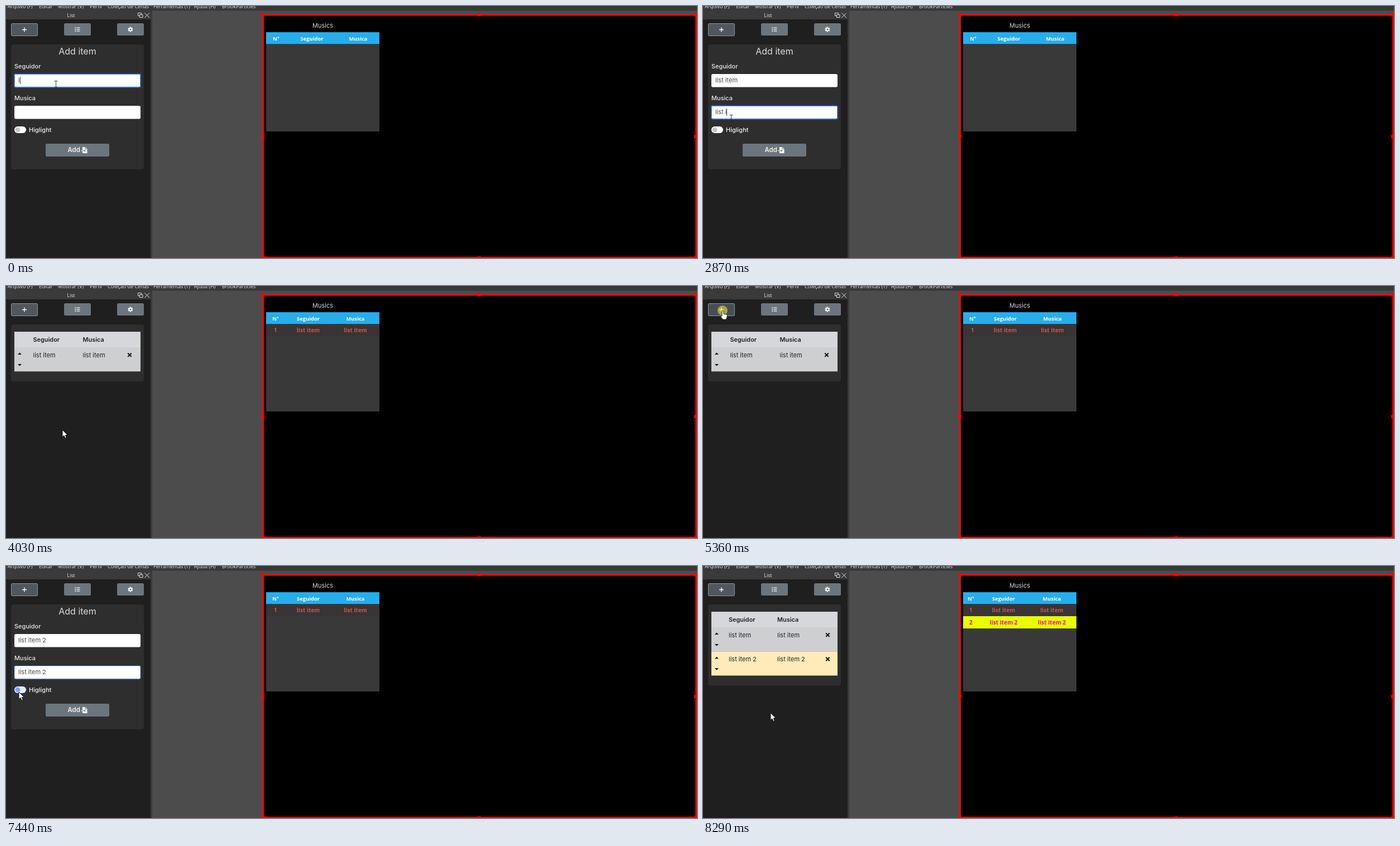
These frames come from a looping animation (1238x452 px, 8.38 s). An HTML page with a canvas:

```html
<!DOCTYPE html>
<html lang="pt">
<head>
<meta charset="utf-8">
<style>
html, body { margin: 0; width: 100%; height: 100%; overflow: hidden; background: #000; }
canvas { display: block; }
</style>
</head>
<body>
<canvas id="stage" width="1238" height="452"></canvas>
<script>
const c = document.getElementById('stage').getContext('2d');
const UI = 'Inter, sans-serif', SYS = '"Open Sans", sans-serif';
const LOOP = 8380, STEP = 77, KEY = 137;
const SAVE = 3950, REOPEN = 5430, SAVE_AGAIN = 7980, TOGGLE = 7510;
const clicks = [1750, 3790, 5360, 5740, 6290, 7820];

// Pointer moves: start, end, destination
const home = { x: 89, y: 140 };
const moves = [[1500, 1750, 50, 201], [3640, 3720, 112, 258], [3870, 4030, 101, 258], [4490, 4880, 158, 135],
  [4880, 5280, 34, 44], [5430, 5670, 79, 134], [6280, 6290, 79, 189], [7230, 7370, 23, 226],
  [7510, 7820, 128, 262], [7980, 8060, 121, 263.5]];

const clamp = (v, a, b) => Math.min(b, Math.max(a, v));
const ramp = (t, from) => clamp((t - from) / 150, 0, 1);
const within = (ranges, t) => ranges.some(([a, b]) => t >= a && t < b);
const keyed = t => clamp(1 + Math.floor(t / KEY), 0, 9);

const follower = { y: 122, focus: [[-LOOP, 1750], [5740, 6290]],
  typed: t => t < REOPEN ? keyed(t) : t < 5970 ? 0 : 11 };
const song = { y: 179, focus: [[1750, SAVE], [6290, 7360]],
  typed: t => t < REOPEN ? keyed(t - 2090) : t < 6290 ? 0 : t < 6520 ? 9 : t < 6840 ? 10 : 11 };

function rect(x, y, w, h, fill, r = 0) {
  c.fillStyle = fill;
  c.beginPath();
  c.roundRect(x, y, w, h, r);
  c.fill();
}
function frame(x, y, w, h, color, r = 0, width = 1) {
  c.strokeStyle = color;
  c.lineWidth = width;
  c.beginPath();
  c.roundRect(x, y, w, h, r);
  c.stroke();
}
function disc(x, y, r, fill) {
  c.fillStyle = fill;
  c.beginPath();
  c.arc(x, y, r, 0, 7);
  c.fill();
}
function text(s, x, y, size, fill, weight = 400, family = UI, align = 'left') {
  c.font = `${weight} ${size}px ${family}`;
  c.textAlign = align;
  c.fillStyle = fill;
  c.fillText(s, x, y);
}
function lines(color, width, ...segments) {
  c.strokeStyle = color;
  c.lineWidth = width;
  c.beginPath();
  for (const [x1, y1, x2, y2] of segments) {
    c.moveTo(x1, y1);
    c.lineTo(x2, y2);
  }
  c.stroke();
}
function cross(x, y, r, color, width) {
  lines(color, width, [x - r, y - r, x + r, y + r], [x + r, y - r, x - r, y + r]);
}
function shape(points, fill, stroke) {
  c.beginPath();
  points.forEach(([x, y]) => c.lineTo(x, y));
  c.closePath();
  c.fillStyle = fill;
  c.fill();
  if (stroke) {
    c.strokeStyle = stroke;
    c.lineWidth = 1;
    c.stroke();
  }
}

function drawWindow() {
  rect(0, 0, 1238, 452, '#4c4c4c');
  rect(0, 0, 1238, 8.5, '#393939');
  const menu = [['Arquivo (F)', 3], ['Editar', 59], ['Mostrar (V)', 93], ['Perfil', 150], ['Coleção de Cenas', 182],
    ['Ferramentas (T)', 264], ['Ajuda (H)', 337], ['BrookParticles', 387]];
  menu.forEach(([s, x]) => text(s, x, 4, 9, '#e4e4e4', 400, SYS));
  rect(0, 8, 262, 444, '#3a3a3a');
  rect(0, 24, 259, 428, '#1f1f1f');
  text('List', 116.5, 20, 9, '#e4e4e4', 400, SYS, 'center');
  frame(236.5, 12.5, 6, 5, '#ddd');
  rect(239, 15, 6, 6, '#3a3a3a');
  frame(239.5, 15.5, 5.5, 5, '#ddd');
  cross(252.7, 16.7, 4.3, '#ddd', 1);
}

function drawToolbar(hover) {
  rect(9, 31, 48, 23, hover ? '#484e53' : '#50575d', 2.5);
  frame(9.5, 31.5, 47, 22, hover ? '#8398ac' : '#8d959c', 2.5);
  rect(104, 31, 48, 22, '#6c757d', 2.5);
  rect(199, 31, 48, 22, '#6c757d', 2.5);
  lines('#fff', 1.3, [29, 42.5, 37, 42.5], [33, 38.5, 33, 46.5]);
  for (let y = 39; y <= 45; y += 3) {
    rect(123.5, y - 0.8, 1.6, 1.6, '#fff');
    lines('#fff', 1.1, [126.5, y, 132.5, y]);
  }
  c.strokeStyle = '#fff';
  c.lineWidth = 2.2;
  c.beginPath();
  c.arc(223, 42, 2.5, 0, 7);
  c.stroke();
  for (let a = Math.PI / 6; a < 6.5; a += Math.PI / 3) {
    const x = Math.cos(a), y = Math.sin(a);
    lines('#fff', 2, [223 + 3 * x, 42 + 3 * y, 223 + 4.6 * x, 42 + 4.6 * y]);
  }
}

function drawField({ y, focus, typed }, t) {
  const glow = focus.reduce((g, [a, b]) => g + ramp(t, a) - ramp(t, b), 0);
  if (glow > 0) rect(13, y - 2, 230, 27.5, `rgba(20,80,180,${0.5 * glow})`, 4);
  rect(15, y, 226, 23.5, '#fff', 2.5);
  if (glow > 0) frame(15.5, y + 0.5, 225, 22.5, `rgba(105,155,235,${glow})`, 2.5);
  const s = 'list item 2'.slice(0, typed(t));
  text(s, 22, y + 15, 11, '#43484d');
  if (within(focus, t)) {
    const x = Math.round(22 + c.measureText(s).width) + 0.5;
    lines('#333', 1, [x, y + 5, x, y + 18]);
  }
}

function drawToggle(t) {
  const focus = ramp(t, 7380), on = t >= TOGGLE;
  if (focus) rect(13, 214, 25, 16, `rgba(20,80,180,${0.4 * focus})`, 8);
  rect(15, 216, 21, 12, on ? '#0d6efd' : focus ? '#e6e9ef' : '#fff', 6);
  disc(21 + 9 * ramp(t, TOGGLE), 222, 4.4, on ? '#fff' : focus ? '#78a5e8' : '#c3c7bd');
}

function drawForm(t, hover) {
  rect(9, 69, 238, 224, '#2f2e2f', 4);
  text('Add item', 128, 87, 16, '#dcdcdc', 400, UI, 'center');
  text('Seguidor', 15, 111.5, 11, '#e8e8e8', 500);
  text('Musica', 15, 168.5, 11, '#e8e8e8', 500);
  drawField(follower, t);
  drawField(song, t);
  drawToggle(t);
  text('Higlight', 41, 225.5, 11, '#f0f0f0', 500);
  rect(71, 247, 114, 23, hover ? '#5c636a' : '#6c757d', 2);
  text('Add', 110.5, 262, 11.5, '#fff', 500);
  shape([[137, 253], [142, 253], [145.5, 256], [145.5, 264], [137, 264]], '#fff');
  lines('#6c757d', 1, [142, 253, 142, 256.5], [142, 256.5, 145.5, 256.5], [137, 259.5, 142, 259.5],
    [140, 257.5, 142.3, 259.5], [140, 261.5, 142.3, 259.5]);
  lines('#fff', 1.3, [134.5, 259.5, 137, 259.5]);
}

function drawList(rows) {
  const [a, b, close] = rows > 1 ? [46, 133, 223.5] : [48.5, 137.5, 221.5];
  rect(9, 69, 238, 59 + 43.3 * rows, '#2f2e2f', 4);
  rect(15, 82, 226, 28, '#d6d7da');
  text('Seguidor', a, 100, 10.9, '#1c1f23', 600);
  text('Musica', b, 100, 10.9, '#1c1f23', 600);
  for (let i = 0; i < rows; i++) {
    const y = 110 + 43.3 * i, label = i ? 'list item 2' : 'list item';
    rect(15, y, 226, 43.3, i ? '#ffebb9' : '#cdcfd1');
    text(label, a, y + 17.5, 11, '#212529');
    text(label, b, y + 17.5, 11, '#212529');
    shape([[21, y + 13], [28, y + 13], [24.5, y + 9.5]], '#111');
    shape([[21, y + 30], [28, y + 30], [24.5, y + 33.5]], '#111');
    cross(close, y + 13.7, 3.2, '#111', 2);
  }
}

function drawPreview(rows) {
  rect(460, 16, 777, 436, '#000');
  frame(460.5, 16, 776, 435.5, '#f00', 0, 3);
  for (const x of [460, 848, 1236]) {
    for (const y of [15.5, 234, 452]) {
      if (x !== 848 || y !== 234) rect(x - 3, y - 3, 6, 6, '#f00');
    }
  }
  const cols = [[484, 548, 631], [483, 541.5, 626], [480, 538.5, 625]][rows];
  const row = (cells, y, size, color) =>
    cells.forEach((s, i) => text(s, cols[i], y, size, color, 700, SYS, 'center'));
  text('Musics', 567.5, 39, 11, '#d4d4d4', 400, UI, 'center');
  rect(466, 47, 203, 178, '#393939');
  rect(466, 47, 203, 21, '#26aeec');
  row(['Nº', 'Seguidor', 'Musica'], 61.5, 9.4, '#fff');
  if (rows > 0) {
    rect(466, 68, 203, 22, '#393435');
    row(['1', 'list item', 'list item'], 83, 10.1, '#bd5a55');
  }
  if (rows > 1) {
    rect(466, 90, 203, 22, '#e6ff00');
    row(['2', 'list item 2', 'list item 2'], 105, 10.1, '#ff00b4');
  }
}

const pointers = {
  arrow() {
    shape([[0, 0], [0, 13], [3, 10.3], [5, 15], [7.3, 14], [5.3, 9.5], [9.3, 9.3]], '#fff', '#111');
  },
  beam() {
    lines('rgba(30,30,20,.8)', 1, [0.5, -6, 0.5, 6], [-2.5, -5.5, 3.5, -5.5], [-2.5, 6, 3.5, 6]);
  },
  hand() {
    shape([[0, 1], [1.5, 0], [3, 1], [3, 6], [8, 7], [9.5, 8.5], [9, 12], [7.5, 16], [1.5, 16], [-3, 10], [0, 10]],
      '#fff', '#222');
  }
};

function pointerAt(t) {
  let { x, y } = home;
  for (const [start, end, toX, toY] of moves) {
    if (t < start) break;
    const f = t >= end ? 1 : Math.floor((t - start) / STEP) * STEP / (end - start);
    x += (toX - x) * f;
    y += (toY - y) * f;
  }
  return { x, y };
}

function pointerKind({ x, y }, listView) {
  const inside = (l, top, r, bottom) => x >= l && x <= r && y >= top && y <= bottom;
  if (inside(9, 31, 57, 54)) return 'hand';
  if (listView) return 'arrow';
  if (inside(71, 247, 185, 270)) return 'hand';
  return [follower, song].some(f => inside(15, f.y, 241, f.y + 23.5)) ? 'beam' : 'arrow';
}

function draw(now) {
  const t = now % LOOP;
  const rows = (t >= SAVE) + (t >= SAVE_AGAIN);
  const listView = within([[SAVE, REOPEN], [SAVE_AGAIN, LOOP]], t);
  const p = pointerAt(t), kind = pointerKind(p, listView), hand = kind === 'hand';
  drawWindow();
  drawToolbar(hand && p.y < 54);
  if (listView) drawList(rows);
  else drawForm(t, hand && p.y > 247);
  drawPreview(rows);
  if (clicks.some(k => t >= k && t < k + STEP)) disc(p.x + hand, p.y, 9, 'rgba(255,250,50,.52)');
  c.save();
  c.translate(p.x, p.y);
  pointers[kind]();
  c.restore();
  requestAnimationFrame(draw);
}
requestAnimationFrame(draw);
</script>
</body>
</html>
```
